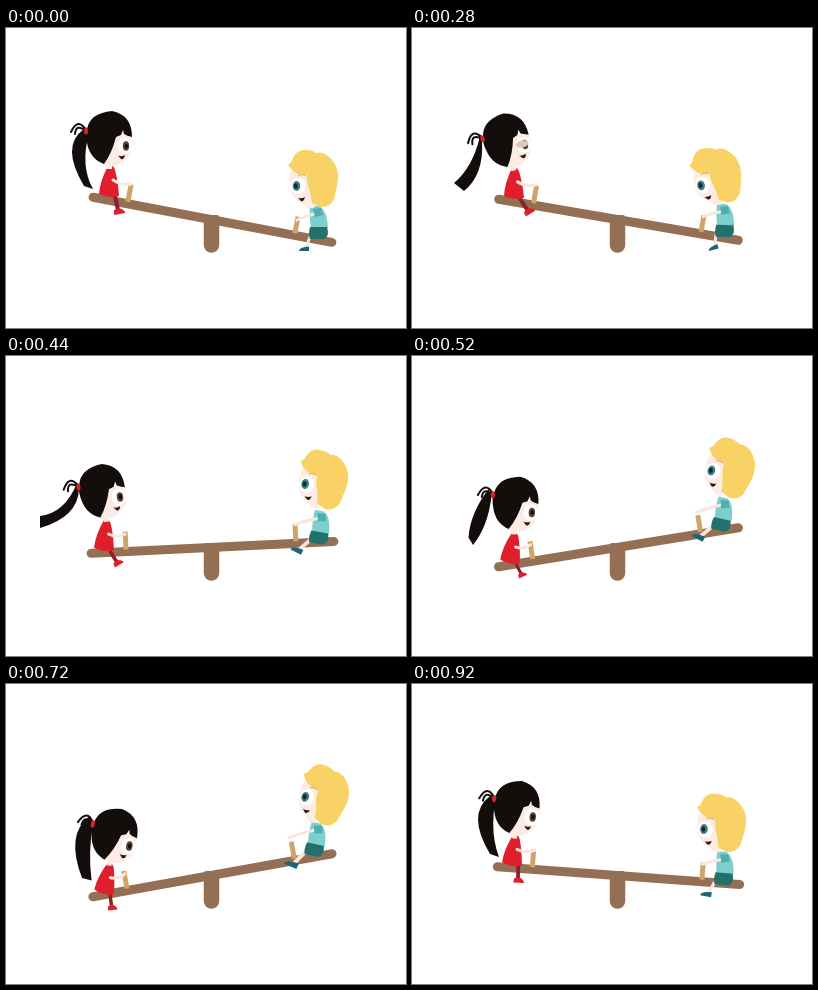
An HTML page without scripts for the animation above (960 ms loop, 400 by 300 pixels).

```html
<!DOCTYPE html>
<html lang="en">
<head>
<meta charset="utf-8">
<title>Seesaw</title>
<style>
  html, body { margin: 0; width: 100%; height: 100%; overflow: hidden; background: #fff; }
  svg { display: block; width: 400px; height: 300px; }

  /* Every pose change is held for 40 ms: the step counts are frames per segment. */
  .move { animation: 960ms -3ms infinite steps(4); }
  .board { animation-name: board; }
  .tail { animation-name: tail; }
  .lid { animation-name: blink; }
  .girl { animation-name: girl; }
  .girl-head { animation-name: girl-head; }
  .girl-arm { animation-name: girl-arm; }
  .girl-leg { animation-name: girl-leg; }
  .boy { animation-name: boy; }
  .boy-head { animation-name: boy-head; }
  .boy-arm { animation-name: boy-arm; }
  .boy-leg { animation-name: boy-leg; }

  .wood { fill: none; stroke: #956f53; stroke-linecap: round; }
  .handle { stroke: #cda56b; stroke-width: 5; }
  .skin { fill: #fdece4; }
  .limb { fill: none; stroke: #fbe6dc; stroke-width: 3; stroke-linecap: round; }
  .hair { fill: #130d0c; }
  .curl { fill: none; stroke: #130d0c; stroke-width: 2; stroke-linecap: round; }
  .red { fill: #e01f2d; }
  .mouth { fill: #2a1512; }

  @keyframes board {
    0% { rotate: 10.7deg; }
    16.667% { rotate: 12.3deg; animation-timing-function: steps(3); }
    29.167% { rotate: 9.7deg; }
    45.833% { rotate: -2.8deg; animation-timing-function: linear(0 0% 25%, .33 25% 50%, .63 50% 75%, .86 75% 100%); }
    62.5% { rotate: -13deg; animation-timing-function: linear(0 0% 20%, .03 20% 40%, .15 40% 60%, .36 60% 80%, .64 80% 100%); }
    83.333% { rotate: -5.2deg; animation-timing-function: steps(3); }
    95.833%, 100% { rotate: 4.2deg; animation-timing-function: steps(1); }
  }

  @keyframes girl {
    0% { translate: 103px 167px; rotate: 0deg; }
    16.667% { translate: 104px 164px; rotate: -4deg; animation-timing-function: steps(3); }
    29.167% { translate: 102px 169px; rotate: -2deg; }
    45.833% { translate: 98px 193px; rotate: 2deg; animation-timing-function: linear(0 0% 25%, .33 25% 50%, .63 50% 75%, .86 75% 100%); }
    62.5% { translate: 98px 213px; rotate: 8deg; animation-timing-function: linear(0 0% 20%, .03 20% 40%, .15 40% 60%, .36 60% 80%, .64 80% 100%); }
    83.333% { translate: 98px 199px; rotate: 10deg; animation-timing-function: steps(3); }
    95.833%, 100% { translate: 100px 180px; rotate: 4deg; animation-timing-function: steps(1); }
  }
  @keyframes girl-head {
    0% { translate: 102px 139px; rotate: 0deg; }
    16.667% { translate: 101px 137px; rotate: -12deg; animation-timing-function: steps(3); }
    29.167% { translate: 100px 141px; rotate: -13deg; }
    45.833% { translate: 98.7px 164px; rotate: -7deg; animation-timing-function: linear(0 0% 25%, .33 25% 50%, .63 50% 75%, .86 75% 100%); }
    62.5% { translate: 101.6px 183.5px; rotate: 10deg; animation-timing-function: linear(0 0% 20%, .03 20% 40%, .15 40% 60%, .36 60% 80%, .64 80% 100%); }
    83.333% { translate: 102px 172px; rotate: 12deg; animation-timing-function: steps(3); }
    95.833%, 100% { translate: 101px 152.4px; rotate: 5deg; animation-timing-function: steps(1); }
  }
  @keyframes girl-arm {
    0% { rotate: 12deg; scale: 1 1; }
    16.667% { rotate: 18deg; scale: 1 1; animation-timing-function: steps(3); }
    29.167% { rotate: 11deg; scale: 1 1; }
    45.833% { rotate: -2deg; scale: .88 1; }
    62.5% { rotate: -29deg; scale: .75 1; animation-timing-function: steps(5); }
    83.333% { rotate: -20deg; scale: .85 1; animation-timing-function: steps(3); }
    95.833%, 100% { rotate: -1deg; scale: .93 1; animation-timing-function: steps(1); }
  }
  @keyframes girl-leg {
    0% { rotate: 0deg; scale: 1; }
    16.667% { rotate: -10deg; scale: 1; animation-timing-function: steps(3); }
    29.167% { rotate: -19deg; scale: 1; }
    45.833% { rotate: -22deg; scale: .9; }
    62.5% { rotate: -20deg; scale: .65; animation-timing-function: steps(5); }
    83.333% { rotate: 6deg; scale: 1; animation-timing-function: steps(3); }
    95.833%, 100% { rotate: 9deg; scale: .95; animation-timing-function: steps(1); }
  }
  @keyframes tail {
    0% { d: path("M78 101Q54 118 78 158L87 161Q74 138 83 105"); }
    16.667% { d: path("M71 102Q61 128 51 154L58 161Q75 135 73 108"); animation-timing-function: steps(3); }
    29.167% { d: path("M68 108Q61 139 42 155L52 163Q72 147 70 113"); }
    45.833% { d: path("M71 127Q59 157 34 160L34 172Q72 161 73 133"); }
    62.5% { d: path("M82 139Q57 158 79 203L88 206Q80 180 86 147"); animation-timing-function: steps(5); }
    83.333% { d: path("M84 128Q61 145 74 188L84 190Q83 160 88 134"); animation-timing-function: steps(3); }
    95.833%, 100% { d: path("M78 112Q54 130 78 170L87 173Q78 150 83 118"); animation-timing-function: steps(1); }
  }
  @keyframes blink {
    0%, 8.333% { scale: 1 0; animation-timing-function: steps(2); }
    16.667%, 25% { scale: 1 1; animation-timing-function: steps(2); }
    33.333%, 100% { scale: 1 0; }
  }

  @keyframes boy {
    0% { translate: 313px 206px; rotate: 0deg; }
    16.667% { translate: 313px 209px; rotate: -6deg; animation-timing-function: steps(3); }
    29.167% { translate: 313px 204px; rotate: 2deg; }
    45.833% { translate: 313px 183px; rotate: 10deg; animation-timing-function: linear(0 0% 25%, .33 25% 50%, .63 50% 75%, .86 75% 100%); }
    62.5% { translate: 307px 162px; rotate: 14deg; animation-timing-function: linear(0 0% 20%, .03 20% 40%, .15 40% 60%, .36 60% 80%, .64 80% 100%); }
    83.333% { translate: 311px 176px; rotate: 10deg; animation-timing-function: steps(3); }
    95.833%, 100% { translate: 312px 196px; rotate: 5deg; animation-timing-function: steps(1); }
  }
  @keyframes boy-head {
    0% { translate: 304px 178px; rotate: 0deg; }
    16.667% { translate: 302.2px 183px; rotate: -13deg; animation-timing-function: steps(3); }
    29.167% { translate: 305.5px 175px; rotate: -9deg; }
    45.833% { translate: 309px 150px; rotate: 10deg; animation-timing-function: linear(0 0% 25%, .33 25% 50%, .63 50% 75%, .86 75% 100%); }
    62.5% { translate: 305.4px 130.2px; rotate: 20deg; animation-timing-function: linear(0 0% 20%, .03 20% 40%, .15 40% 60%, .36 60% 80%, .64 80% 100%); }
    83.333% { translate: 307px 146.5px; rotate: 14deg; animation-timing-function: steps(3); }
    95.833%, 100% { translate: 304px 166px; rotate: 4deg; animation-timing-function: steps(1); }
  }
  @keyframes boy-arm {
    0% { rotate: 0deg; scale: 1 1; }
    16.667% { rotate: 10deg; scale: .93 1; animation-timing-function: steps(3); }
    29.167% { rotate: 2deg; scale: 1 1; }
    45.833% { rotate: -10deg; scale: 1.33 1; }
    62.5% { rotate: -20deg; scale: 1.5 1; animation-timing-function: steps(5); }
    83.333% { rotate: -12deg; scale: 1.43 1; animation-timing-function: steps(3); }
    95.833%, 100% { rotate: 0deg; scale: 1.05 1; animation-timing-function: steps(1); }
  }
  @keyframes boy-leg {
    0% { rotate: 0deg; scale: 1; }
    16.667% { rotate: -6deg; scale: .9; animation-timing-function: steps(3); }
    29.167% { rotate: -17deg; scale: 1; }
    45.833% { rotate: 17deg; scale: 1.2; }
    62.5% { rotate: 13deg; scale: 1.3; animation-timing-function: steps(5); }
    83.333% { rotate: 8deg; scale: 1.4; animation-timing-function: steps(3); }
    95.833%, 100% { rotate: 5deg; scale: 1.1; animation-timing-function: steps(1); }
  }
</style>
</head>
<body>
<svg viewBox="0 0 400 300">
  <path class="wood" stroke-width="15.5" d="M205.5 195V217"/>
  <rect x="198" y="187" width="15" height="14" rx="2" fill="#956f53"/>
  <g transform="translate(205 191.5)">
    <g class="move board">
      <path class="wood" stroke-width="9" d="M-120 0H123"/>
      <path class="handle" d="M-85 -2V-20M85 -2V-19"/>
    </g>
  </g>

  <path class="move tail hair" d="M78 101Q54 118 78 158L87 161Q74 138 83 105"/>
  <g class="move girl">
    <g transform="translate(8 2)">
      <g class="move girl-leg">
        <path d="M-2 -1L1 13" fill="none" stroke="#8d1f2c" stroke-width="4"/>
        <path class="red" d="M-3 13L2 11Q8 13 8 16L-3 18Z"/>
      </g>
    </g>
    <path class="red" d="M-1 -29Q5 -30 6 -25Q9 -14 10 1Q1 4 -10 -1Q-9 -14 -1 -29Z"/>
    <g transform="translate(4 -15)">
      <path class="move girl-arm limb" d="M0 0Q10 4 19 0"/>
    </g>
  </g>
  <g class="move girl-head">
    <path class="skin" d="M-10 -32H24Q26 -14 18 -8Q12 -1 4 -1V2H-1V-1L-6 -2Z"/>
    <ellipse cx="17" cy="-21" rx="7.5" ry="8" fill="#fff"/>
    <ellipse cx="18" cy="-21" rx="3.2" ry="4.8" fill="#5b4236"/>
    <ellipse cx="18.3" cy="-21" rx="1.6" ry="2.6" fill="#130d0c"/>
    <g transform="translate(15.5 -22)">
      <ellipse class="move lid" rx="6.5" ry="7" fill="#e3c6b6"/>
    </g>
    <path class="mouth" d="M10 -11.5Q14 -10 17 -12Q16 -7 13 -8Z"/>
    <path class="curl" d="M-22 -37Q-30 -50 -37 -35M-22 -36Q-32 -44 -33 -33"/>
    <path class="hair" d="M-21 -38Q-18 -54 4 -56Q24 -52 24 -30Q19 -31 16 -33L15 -37L13 -32L8 -30Q4 -14 -4 -3Q-18 -8 -21 -24Q-23 -32 -21 -38Z"/>
    <ellipse class="red" cx="-22" cy="-36" rx="2" ry="3.6"/>
  </g>

  <g class="move boy">
    <g transform="translate(-9 3)">
      <g class="move boy-leg">
        <path class="limb" d="M0 0L-4 10"/>
        <path d="M-1 9.5L-5 10Q-11 11 -11 14H-1Z" fill="#1a6677"/>
      </g>
    </g>
    <path d="M-9 -28H0Q8 -24 9 -6H-8Q-10 -18 -9 -28Z" fill="#7ccfcd"/>
    <path d="M-9 -7H8Q11 2 5 5H-9Q-11 0 -9 -7Z" fill="#24706b"/>
    <g transform="translate(-5 -20)">
      <path class="move boy-arm limb" d="M0 0Q-9 2 -17 6"/>
    </g>
    <path d="M-6 -25L2 -26L4 -19L-4 -17Z" fill="#4eaeb0"/>
  </g>
  <g class="move boy-head">
    <path class="skin" d="M-19 -36Q-24 -12 -10 -4Q-4 0 -3 2H3L8 -2L10 -34Z"/>
    <ellipse cx="-12" cy="-20" rx="7.5" ry="8" fill="#fff"/>
    <ellipse cx="-13.5" cy="-20" rx="3.8" ry="5" fill="#3c7f87"/>
    <ellipse cx="-14" cy="-20" rx="1.9" ry="2.7" fill="#14282c"/>
    <path class="mouth" d="M-12 -8Q-8 -7 -5 -9Q-6 -4 -9 -5Z"/>
    <path d="M-22 -41Q-18 -44 -17 -48Q-13 -57 -4 -56Q3 -56 6 -53Q16 -56 25 -42Q30 -32 27 -20L24 -7Q20 2 10 1L2 -3L0 -14Q-4 -24 -3 -31Q-14 -29 -22 -41Z" fill="#f8d264"/>
    <path d="M-12 -30Q-8 -33 -4 -30" fill="none" stroke="#dfae6a"/>
  </g>
</svg>
</body>
</html>
```
